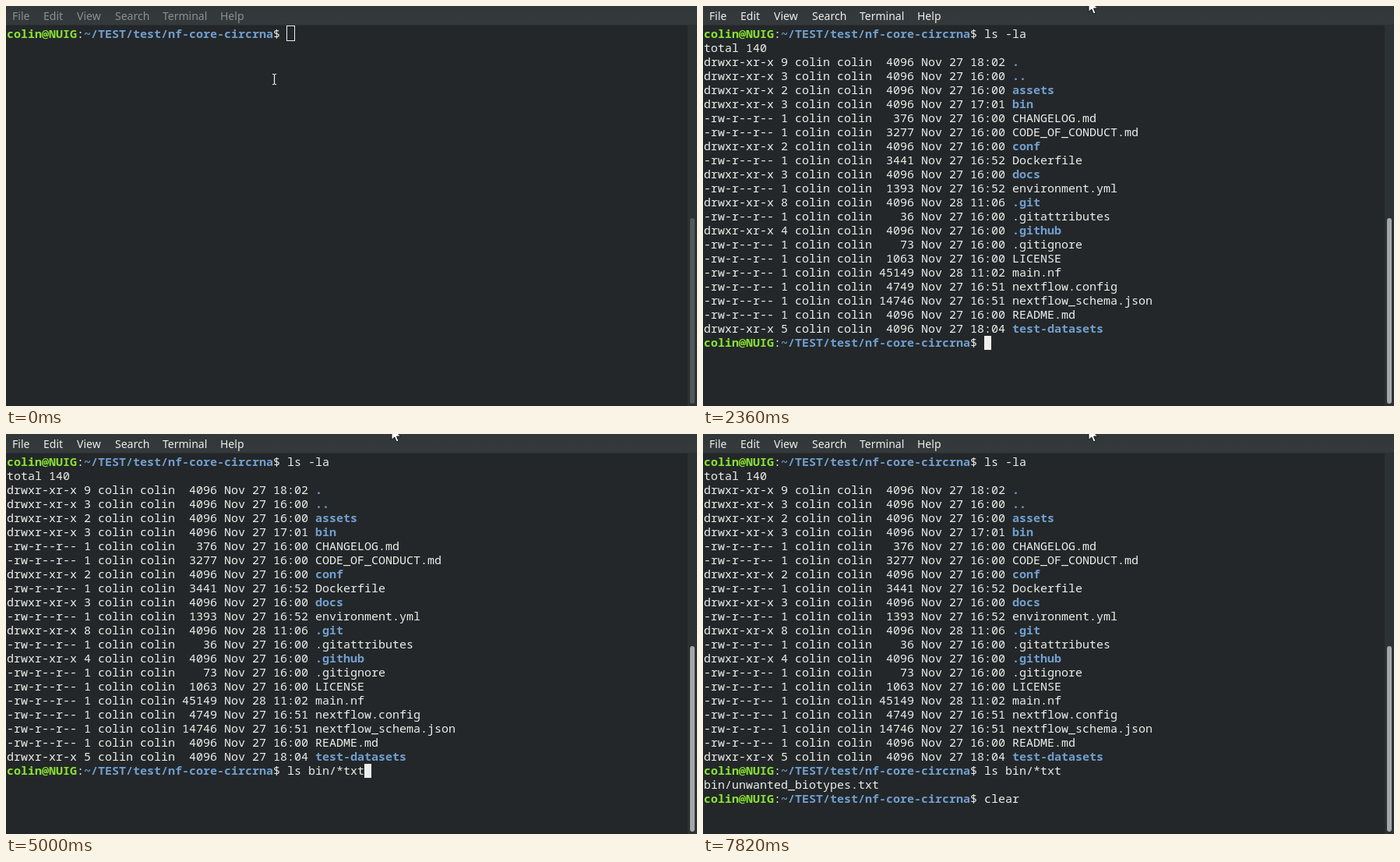
An HTML page that plays this animation: 887 px wide and 513 px high, repeating every 8 s.

```html
<!DOCTYPE html>
<html lang="en">
<head>
<meta charset="utf-8">
<title>Terminal session</title>
<style>
  html, body { margin: 0; width: 100%; height: 100%; overflow: hidden; background: #232729; }
  #stage { position: relative; width: 887px; height: 513px; overflow: hidden; background: #232729; --grey: #8b9091; }
  #menu { position: absolute; inset: 0 0 auto; height: 24px; background: linear-gradient(#32373a, #343a3c); border-bottom: 1px solid #2a2f31; }
  #menu span { position: absolute; top: 3px; font: 14px/20px "Noto Sans", "Open Sans", sans-serif; }
  #track { position: absolute; left: 875px; top: 25px; width: 12px; height: 488px; background: #2c3133; }
  #thumb { position: absolute; left: 878px; top: 272px; width: 6px; height: 238px; border-radius: 3px; }
  #screen { position: absolute; left: 1px; top: 26px; margin: 0; color: #eeeeec; font: 15px/18px "Noto Sans Mono", "DejaVu Sans Mono", monospace; white-space: pre; }
  #screen div { height: 18px; }
  .user { color: #8ae234; font-weight: bold; }
  .dir { color: #729fcf; font-weight: bold; }
  #caret { position: absolute; width: 9px; height: 18px; background: #eeeeec; }
  #caret.hollow { width: 9px; height: 18px; margin: -1px; border: 1px solid #eeeeec; background: none; }
  svg { position: absolute; left: 0; top: 0; overflow: visible; }
</style>
</head>
<body>
<div id="stage">
  <div id="menu"></div>
  <div id="track"></div>
  <div id="thumb"></div>
  <div id="screen"></div>
  <div id="caret"></div>
  <svg width="1" height="1">
    <path id="beam" d="M-2.5-6.5h2m1 0h2M-2.5 6.5h2m1 0h2M0-6.5v13" fill="none" stroke="#f4f4f4" stroke-width="1.2"/>
    <path id="arrow" d="M0 0V16L3.8 12.6L6.3 18.5L9 17.4L6.5 11.6H11.6Z" fill="#fff" stroke="#101010" stroke-width="1"/>
  </svg>
</div>
<script>
const LOOP = 8000, BLINK = 340, FOCUS = 740, FADE = 220;
const $ = id => document.getElementById(id);
const clamp = v => Math.max(0, Math.min(1, v));
const mix = (a, b, k) => `rgb(${a.map((v, i) => Math.round(v + (b[i] - v) * k))})`;

const menu = { File: 8, Edit: 48, View: 91, Search: 140, Terminal: 201, Help: 275 };
$('menu').innerHTML = Object.entries(menu)
  .map(([name, x]) => `<span style="left:${x}px">${name}</span>`).join('');

const user = 'colin';
const prompt = `<span class="user">${user}@NUIG</span>:<span class="dir">~/TEST/test/nf-core-circrna</span>$ `;
const promptLength = 40;

// kind, links, size, day, time, name
const files = `d 9 4096 27 18:02 .
d 3 4096 27 16:00 ..
d 2 4096 27 16:00 assets
d 3 4096 27 17:01 bin
- 1 376 27 16:00 CHANGELOG.md
- 1 3277 27 16:00 CODE_OF_CONDUCT.md
d 2 4096 27 16:00 conf
- 1 3441 27 16:52 Dockerfile
d 3 4096 27 16:00 docs
- 1 1393 27 16:52 environment.yml
d 8 4096 28 11:06 .git
- 1 36 27 16:00 .gitattributes
d 4 4096 27 16:00 .github
- 1 73 27 16:00 .gitignore
- 1 1063 27 16:00 LICENSE
- 1 45149 28 11:02 main.nf
- 1 4749 27 16:51 nextflow.config
- 1 14746 27 16:51 nextflow_schema.json
- 1 4096 27 16:00 README.md
d 5 4096 27 18:04 test-datasets`;

const listing = files.split('\n').map(line => {
  const [kind, links, size, day, time, name] = line.split(' ');
  const isDir = kind === 'd';
  const mode = isDir ? 'drwxr-xr-x' : '-rw-r--r--';
  const label = isDir ? `<span class="dir">${name}</span>` : name;
  return `${mode} ${links} ${user} ${user} ${size.padStart(5)} Nov ${day} ${time} ${label}`;
});

const commands = [
  { text: 'ls -la', keys: [1600, 1700, 1780, 1860, 1940, 2020], enter: 2360, output: ['total 140', ...listing] },
  { text: 'ls bin/*txt', keys: [3220, 3280, 3340, 3560, 3640, 3700, 4360, 4540, 4860, 4940, 5000], enter: 5800, output: ['bin/unwanted_biotypes.txt'] },
  { text: 'clear', keys: [7000, 7080, 7160, 7320, 7480], enter: Infinity, output: [] }
];

function session(t) {
  const lines = [];
  let last = 920, column = promptLength;
  for (const { text, keys, enter, output } of commands) {
    const pressed = keys.filter(k => k <= t);
    lines.push(prompt + text.slice(0, pressed.length));
    column = promptLength + pressed.length;
    last = Math.max(last, ...pressed);
    if (t < enter) break;
    last = enter;
    lines.push(...output);
  }
  return { lines, last, column, row: lines.length - 1 };
}

let shown = '';
function drawScreen(t) {
  const { lines, last, column, row } = session(t);
  const html = lines.map(line => `<div>${line}</div>`).join('');
  if (html !== shown) $('screen').innerHTML = shown = html;
  const caret = $('caret');
  const on = t < last || Math.floor((t - last) / BLINK) % 2 === 0;
  caret.className = t < FOCUS ? 'hollow' : '';
  caret.style.left = 1 + column * 9 + 'px';
  caret.style.top = 27 + row * 18 - (t < FOCUS ? 1 : 0) + 'px';
  caret.style.visibility = on ? 'visible' : 'hidden';
}

function drawFocus(t) {
  const k = clamp((t - FOCUS) / FADE);
  $('menu').style.color = mix([139, 144, 145], [238, 238, 236], k);
  $('thumb').style.background = mix([83, 88, 90], [164, 167, 168], k);
}

function drawPointer(t) {
  const p = clamp((t - 120) / 320), k = p * p * (3 - 2 * p);
  const x = 344.5 + 150.5 * k, y = 94 - 102.5 * k;
  const inText = y > 25;
  $('beam').style.display = inText ? '' : 'none';
  $('arrow').style.display = inText ? 'none' : '';
  $(inText ? 'beam' : 'arrow').setAttribute('transform', `translate(${x} ${y})`);
}

const start = performance.now();
function frame() {
  const t = (performance.now() - start) % LOOP;
  drawScreen(t);
  drawFocus(t);
  drawPointer(t);
  requestAnimationFrame(frame);
}
frame();
</script>
</body>
</html>
```
